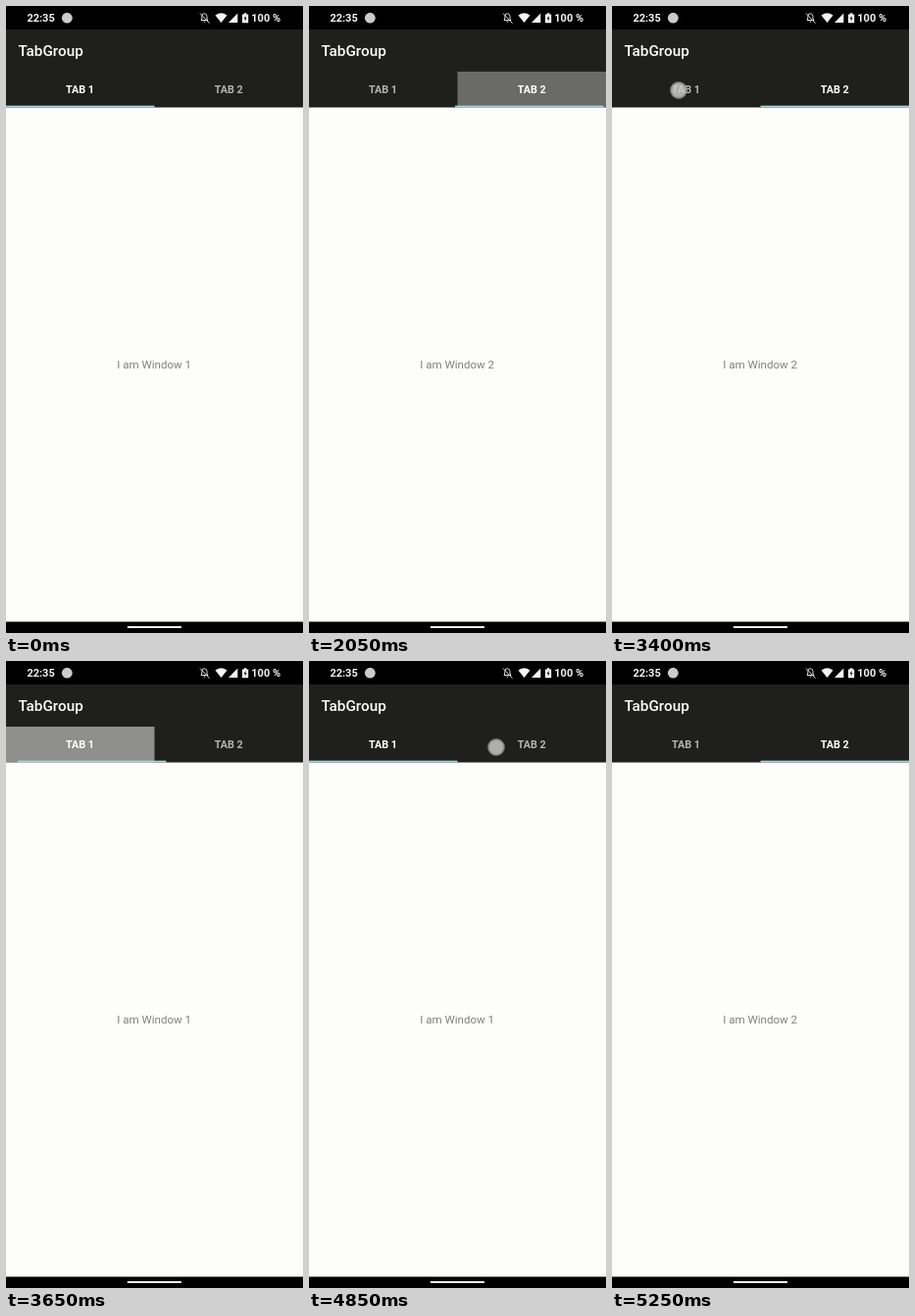
An HTML page for the animation above (5.3 s loop, 303 px wide and 640 px high).

```html
<!DOCTYPE html>
<html lang="en">
<head>
<meta charset="utf-8">
<title>Tabs</title>
<style>
html, body { margin: 0; height: 100%; overflow: hidden; background: #000; }
svg { display: block; width: 303px; height: 640px; font-family: Roboto, sans-serif; }
.tab { font-size: 10.8px; font-weight: 600; text-anchor: middle; }
.status { font-size: 11px; font-weight: 600; fill: #f4f4f4; }
</style>
</head>
<body>
<svg viewBox="0 0 303 640">
  <defs><clipPath id="clip"><rect id="area" y="67" width="151.5" height="36.5"/></clipPath></defs>
  <rect width="303" height="640"/>
  <rect y="24" width="303" height="79.5" fill="#1f1f1d"/>
  <rect y="103.5" width="303" height="525" fill="#fdfdfc"/>

  <g class="status">
    <text x="21.4" y="16.4">22:35</text>
    <text x="250.3" y="16.4">100 %</text>
    <circle cx="62.3" cy="12.2" r="5.4" fill="#ccc"/>
    <path d="M199 14.5h7l-1-1.5v-2.5q0-2.5-2.5-2.8t-2.7 2.8v2.5zM201.6 16h1.8" fill="none" stroke="#ddd"/>
    <path d="M198 7.5l9.5 10" stroke="#ddd"/>
    <path d="M213.5 9.5q6-4.4 12 0l-6 7.5z"/>
    <path d="M227 17h9.3V7.5z"/>
    <path d="M241 8.6h1.8V7.2h2.6v1.4h1.8v8.6H241z"/>
    <path d="M244.4 9.8l-1.6 3.3h1v2.5l1.7-3.3h-1.1z" fill="#000"/>
  </g>

  <text x="12.5" y="51.4" font-size="15.3" font-weight="500" fill="#fff">TabGroup</text>
  <circle id="ripple" fill="#fff" clip-path="url(#clip)"/>
  <text id="tab1" class="tab" x="75.5" y="89.3">TAB 1</text>
  <text id="tab2" class="tab" x="227.2" y="89.3">TAB 2</text>
  <rect id="bar" y="101.7" width="151.5" height="1.8" fill="#aed6d6"/>
  <circle id="touch" r="8" fill="#c8c8c8" fill-opacity=".85" stroke="#8a8a88" stroke-width="1.8" stroke-opacity=".8"/>
  <text id="label" x="151.1" y="370" font-size="11.55" fill="#808080" text-anchor="middle"></text>
  <rect x="123.6" y="633" width="55.6" height="2" rx="1" fill="#eee"/>
</svg>
<script>
const LOOP = 5300, STEP = 50, HALF = 151.5;
const taps = [
  { at: 1750, tab: 2, x: 203, y: 87 },
  { at: 3400, tab: 1, x: 68, y: 86 },
  { at: 4850, tab: 2, x: 191, y: 88 }
];
const el = id => document.getElementById(id);
const set = (id, attrs) => {
  for (const k in attrs) el(id).setAttribute(k, attrs[k]);
};
const ramp = (t, from, to) => Math.min(1, Math.max(0, (t - from) / (to - from)));

// cubic-bezier(.4, 0, .2, 1)
function ease(x) {
  let lo = 0, hi = 1;
  for (let i = 0; i < 24; i++) {
    const s = (lo + hi) / 2, r = 1 - s;
    if (1.2 * s * r * r + 0.6 * s * s * r + s ** 3 < x) lo = s; else hi = s;
  }
  return lo * lo * (3 - 2 * lo);
}

function draw(t) {
  const tap = taps.filter(p => p.at <= t).pop() || { at: -LOOP, tab: 1, x: 0, y: 0 };
  const age = t - tap.at;
  const pressed = age < 50;
  const tab = pressed ? 3 - tap.tab : tap.tab;
  const move = ease(ramp(age, 50, 350));

  set("bar", { x: HALF * (tap.tab === 2 ? move : 1 - move) });
  set("tab1", { fill: tab === 1 ? "#fff" : "#b4b4b4" });
  set("tab2", { fill: tab === 2 ? "#fff" : "#b4b4b4" });
  el("label").textContent = "I am Window " + tab;
  set("touch", { cx: tap.x, cy: tap.y, visibility: pressed ? "visible" : "hidden" });

  set("area", { x: HALF * (tap.tab - 1) });
  set("ripple", {
    cx: tap.x, cy: tap.y,
    r: 12 + 125 * ease(ramp(age, 0, 225)),
    opacity: 0.5 * ramp(age, 0, 100) * (1 - ramp(age, 250, 400))
  });
}

function frame(now) {
  draw(Math.floor(now % LOOP / STEP) * STEP);
  requestAnimationFrame(frame);
}
draw(0);
requestAnimationFrame(frame);
</script>
</body>
</html>
```
